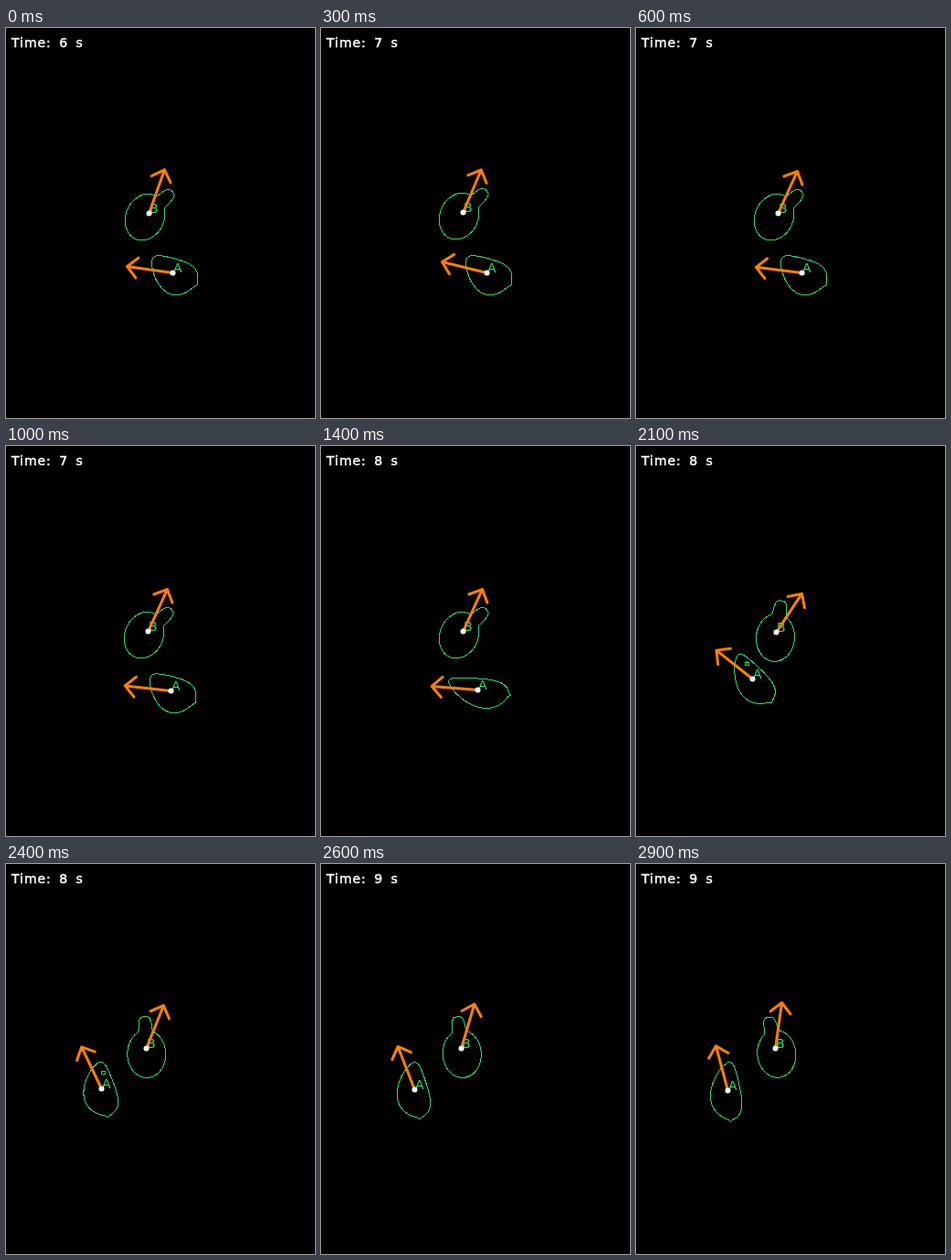
An HTML page for the animation above (3000 ms loop, 338x426 px).

```html
<!DOCTYPE html>
<html lang="en">
<head>
<meta charset="utf-8">
<title>Two cells</title>
<style>
  html, body { margin: 0; width: 100%; height: 100%; overflow: hidden; background: #000; }
  svg { display: block; width: 338px; height: 426px; }
  text { font-family: "DejaVu Sans", sans-serif; }
  #clock { font-size: 14px; letter-spacing: .95px; word-spacing: 3px; fill: #fff; stroke: #fff; stroke-width: .5; }
  .outline, #fold { fill: none; stroke: #2fd672; stroke-width: 1; shape-rendering: crispEdges; }
  .label { font-size: 14px; fill: #24e870; }
  .arrow { fill: none; stroke: #ff8000; stroke-width: 3; stroke-linecap: round; stroke-linejoin: round; }
  .dot { fill: #fff; }
</style>
</head>
<body>
<svg viewBox="0 0 338 426">
  <text id="clock" x="6" y="20.5">Time: 6 s</text>
  <g transform="translate(.5 .5)">
    <g id="a"></g>
    <g id="b"></g>
    <circle id="fold" r="2"/>
  </g>
</svg>
<script>
const LOOP = 3000, STEP = 100, POINTS = 120;
const RAD = Math.PI / 180;
const $ = id => document.getElementById(id);
const mix = (a, b, k) => a + (b - a) * k;

// Key poses: heading turns the arrow, axis points to the narrow end of A,
// lobe points to the knob of B.
const keysA = [
  { t: 0, x: 182, y: 267, heading: 188, axis: 211, length: 27 },
  { t: 300, x: 181, y: 267, heading: 193.8, axis: 211, length: 27 },
  { t: 600, x: 181, y: 267, heading: 187, axis: 211, length: 27 },
  { t: 1200, x: 180, y: 267, heading: 186, axis: 210, length: 27 },
  { t: 1400, x: 171, y: 266, heading: 184.6, axis: 193, length: 33 },
  { t: 1800, x: 149, y: 263, heading: 192.4, axis: 208, length: 32 },
  { t: 2400, x: 104, y: 245, heading: 244.4, axis: 262, length: 29 },
  { t: 2900, x: 100, y: 247, heading: 255, axis: 269, length: 31 }
];
const keysB = [
  { t: 0, x: 156, y: 202, heading: -70.5, lobe: -43 },
  { t: 300, x: 155, y: 201, heading: -67, lobe: -43 },
  { t: 600, x: 155, y: 202, heading: -65.5, lobe: -43 },
  { t: 1400, x: 155, y: 202, heading: -65.5, lobe: -43 },
  { t: 1800, x: 153, y: 204, heading: -45, lobe: -68 },
  { t: 2400, x: 153, y: 201, heading: -68, lobe: -93 },
  { t: 2900, x: 152, y: 201, heading: -82, lobe: -103 }
];

function poseAt(keys, t) {
  const i = Math.max(1, keys.findIndex(k => k.t >= t));
  const a = keys[i - 1], b = keys[i];
  const k = (t - a.t) / (b.t - a.t);
  const pose = {};
  for (const name in a) pose[name] = mix(a[name], b[name], k);
  pose.x = Math.round(pose.x);
  pose.y = Math.round(pose.y);
  return pose;
}

// Turns (along, across) of an axis into stage coordinates.
function toStage({ x, y }, degrees, along, across) {
  const c = Math.cos(degrees * RAD), s = Math.sin(degrees * RAD);
  return [x + along * c - across * s, y + along * s + across * c];
}

function trace(pointAt) {
  const pts = Array.from({ length: POINTS }, (_, i) => pointAt((i / POINTS * 2 - 1) * Math.PI));
  return "M" + pts.map(p => p.map(v => v.toFixed(2))).join("L") + "Z";
}

// A bent pear of constant area with a pointed tail.
function pear(pose) {
  const width = 500 / pose.length;
  return trace(a => {
    const tail = 3 * Math.exp(-8 * (Math.PI - Math.abs(a)));
    const along = pose.length * Math.cos(a) - tail;
    const across = width * Math.sin(a) * (1 - .33 * Math.cos(a)) + 2.5 * Math.cos(2 * a);
    return toStage(pose, pose.axis, along, across);
  });
}

// An oval with a knob; the oval leans half as far as the knob.
function knobbed(pose) {
  const [x, y] = toStage(pose, pose.lobe, -6, 0);
  const lean = (pose.lobe - 90) / 2 - pose.lobe;
  return trace(a => {
    const e = a - lean * RAD;
    const oval = 1 / Math.hypot(Math.cos(e) / 26, Math.sin(e) / 21);
    const r = mix(oval, 41, Math.exp(-((a / .23) ** 4)));
    return toStage({ x, y }, pose.lobe, r * Math.cos(a), r * Math.sin(a));
  });
}

function makeCell(id, keys, shape) {
  const cell = $(id);
  cell.innerHTML = `<path class="outline"/><text class="label">${id.toUpperCase()}</text>
    <path class="arrow" d="M0 0H50.5M39.5 -11L50.5 0L39.5 11"/><circle class="dot" r="3"/>`;
  const [outline, label, arrow, dot] = cell.children;
  return t => {
    const pose = poseAt(keys, t);
    const place = `translate(${pose.x} ${pose.y})`;
    outline.setAttribute("d", shape(pose));
    label.setAttribute("transform", `${place} translate(.5 -.5)`);
    arrow.setAttribute("transform", `${place} rotate(${pose.heading})`);
    dot.setAttribute("transform", place);
    return pose;
  };
}

const drawA = makeCell("a", keysA, pear);
const drawB = makeCell("b", keysB, knobbed);
let last = -1;

function render(now) {
  const t = Math.floor((now % LOOP) / STEP) * STEP;
  if (t === last) return;
  last = t;
  const poseA = drawA(t);
  drawB(t);
  const [fx, fy] = toStage(poseA, poseA.axis, 17, 4.5);
  $("fold").setAttribute("transform", `translate(${fx} ${fy})`);
  $("fold").setAttribute("visibility", t >= 1800 && t <= 2400 ? "visible" : "hidden");
  $("clock").textContent = `Time: ${6 + Math.floor((t + 1100) / 1200)} s`;
}

const start = performance.now();
function tick() {
  render(performance.now() - start);
  requestAnimationFrame(tick);
}
tick();
</script>
</body>
</html>
```
